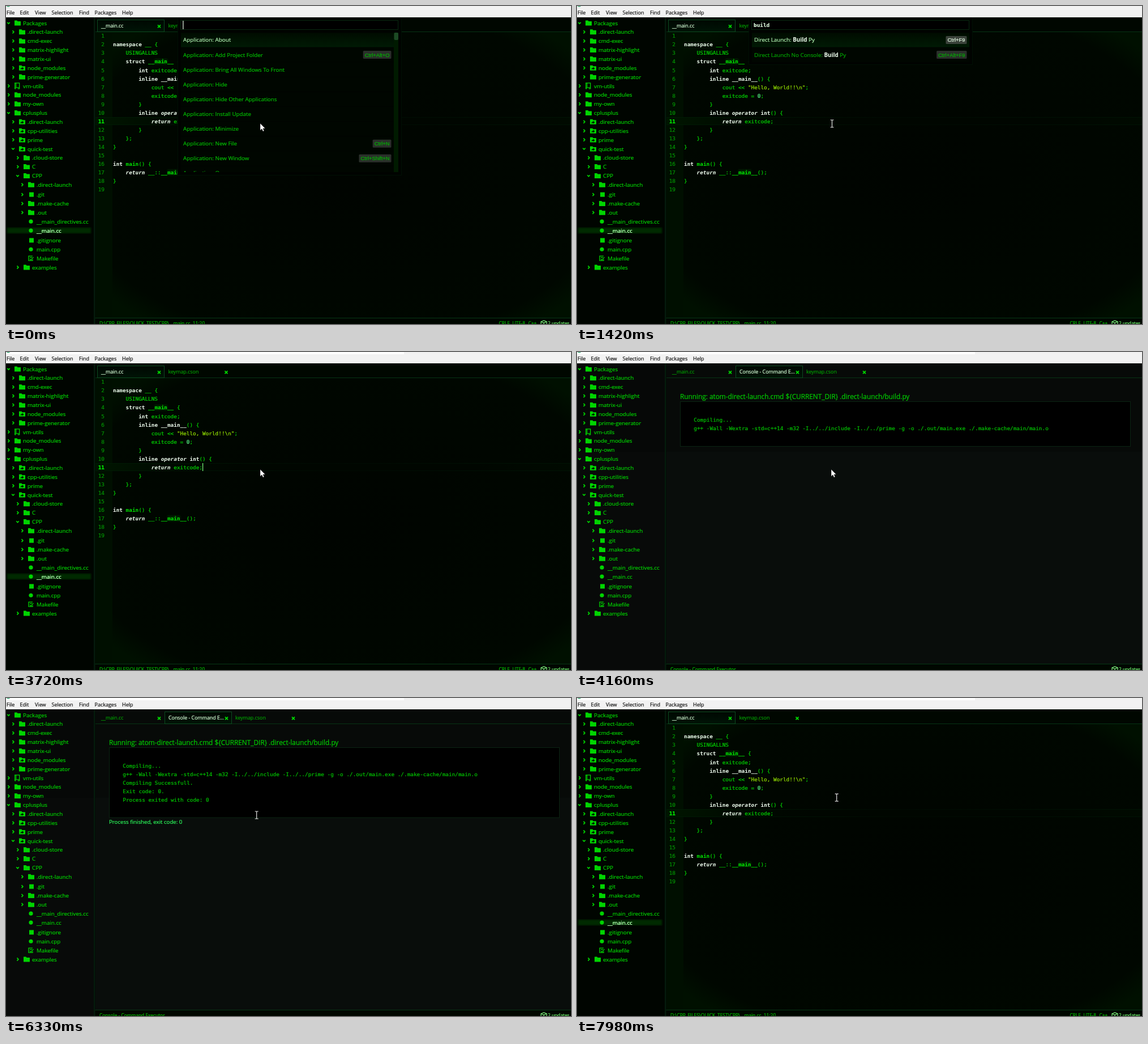
Recreate the animation shown at these times as an HTML page. Size 998x561 px, loop 8000 ms.

```html
<!DOCTYPE html>
<html lang="en">
<head>
<meta charset="utf-8">
<title>Editor build run</title>
<style>
  html, body { margin: 0; width: 100%; height: 100%; overflow: hidden; background: #000; }
  svg { display: block; width: 998px; height: 561px; }
  text { white-space: pre; font-family: "Open Sans", "Noto Sans", sans-serif; stroke-width: .22; }
  .mono { font-family: "DejaVu Sans Mono", monospace; font-size: 9.39px; }
  .key { font-family: "Liberation Sans", Arial, sans-serif; font-size: 9.4px; }
  .kw, .it, .hit { font-weight: bold; fill: #f0fff0; stroke: none; }
  .it { font-style: italic; }
  .str { fill: #96e400; stroke: #96e400; }
  .num { fill: #5cff8c; stroke: #5cff8c; }
  .name { fill: #00e600; font-weight: bold; stroke: none; }
</style>
</head>
<body>
<svg id="stage" viewBox="0 0 998 561" xmlns="http://www.w3.org/2000/svg"></svg>
<script>
const LOOP = 8000;
const GREEN = '#00d400';
const CELL = 5.653;
const stage = document.getElementById('stage');
const pen = document.createElement('canvas').getContext('2d');

const esc = s => s.replace(/&/g, '&amp;').replace(/</g, '&lt;');
const rect = (x, y, w, h, fill, extra = '') =>
  `<rect x="${x}" y="${y}" width="${w}" height="${h}" fill="${fill}" ${extra}/>`;
const rawText = (x, y, body, fill, size, extra = '') =>
  `<text x="${x}" y="${y}" fill="${fill}" stroke="${fill}" ${size ? `font-size="${size}"` : ''} ${extra}>${body}</text>`;
const label = (x, y, s, fill, size, extra) => rawText(x, y, esc(s), fill, size, extra);
const span = (cls, s) => `<tspan class="${cls}">${s}</tspan>`;
const group = (id, body) => `<g id="${id}">${body}</g>`;

// ---- menu and project tree ----
function menuBar() {
  const items = [['File', 1], ['Edit', 24.5], ['View', 51], ['Selection', 80.5],
    ['Find', 129], ['Packages', 156.5], ['Help', 205]];
  return rect(0, 0, 998, 20, '#f2f2f2') + group('titleStrip', rect(0, 0, 703, 4, '#fff')) +
    '<circle cx="4" cy="-2" r="3.5" fill="#3fae7a"/>' +
    items.map(([s, x]) => label(x, 15, s, '#151515', 9, 'stroke-width="0"')).join('');
}

function icon(kind, x, y) {
  const folder = `<path d="M${x} ${y - 4.5}h4.5l1 1.5h5.5v7.5h-11z" fill="${GREEN}"/>`;
  switch (kind) {
    case 'folder': return folder;
    case 'link': return folder +
      `<path d="M${x + 2.5} ${y + 2.5}q0-2.5 3-2.5v-1.7l3 2.6-3 2.6v-1.7z" fill="#000600"/>`;
    case 'repo': return `<path d="M${x + .7} ${y - 5}h8v8h-8zM${x + .7} ${y + 3}v2h2m3 0h3v-2M${x + 2.6} ${y - 5}v8" fill="none" stroke="${GREEN}" stroke-width="1.3"/>`;
    case 'square': return rect(x + 2, y - 4, 8, 8, GREEN);
    case 'dot': return `<circle cx="${x + 5}" cy="${y}" r="3.6" fill="${GREEN}"/>`;
    default: return `<path d="M${x + 8} ${y - 4}h-7v8h7v-2M${x + 3} ${y - 1.5}h4M${x + 3} ${y + 1}l2 2 4.5-5" fill="none" stroke="${GREEN}" stroke-width="1.3"/>`;
  }
}

function chevron(x, y, open) {
  const d = open ? `M${x - 2.3} ${y - 1.2}l2.3 2.4 2.3-2.4` : `M${x - 1} ${y - 2.6}l2.4 2.6-2.4 2.6`;
  return `<path d="${d}" fill="none" stroke="${GREEN}" stroke-width="1.7"/>`;
}

// Each row: depth, arrow (v open, > closed, - none), icon, name
const TREE = `0 v folder Packages
1 > folder .direct-launch
1 > folder cmd-exec
1 > folder matrix-highlight
1 > folder matrix-ui
1 > link node_modules
1 > folder prime-generator
0 > repo vm-utils
0 > folder node_modules
0 > folder my-own
0 v folder cplusplus
1 > link .direct-launch
1 > link cpp-utilities
1 > link prime
1 v link quick-test
2 > folder .cloud-store
2 > folder C
2 v folder CPP
3 > folder .direct-launch
3 > square .git
3 > folder .make-cache
3 > folder .out
3 - dot __main_directives.cc
3 - dot __main.cc
3 - square .gitignore
3 - dot main.cpp
3 - make Makefile
2 > folder examples`.split('\n').map(row => row.split(' '));
const rowY = i => 30 + 15.85 * i + (i >= 19 ? 1.5 : 0) + (i >= 24 ? 1.5 : 0);

function tree() {
  return TREE.map(([depth, arrow, kind, name], i) => {
    const dx = depth * 8, y = rowY(i);
    return (arrow === '-' ? '' : chevron(4.5 + dx, y, arrow === 'v')) +
      icon(kind, 15 + dx, y) + label(30 + dx, y + 3.6, name, GREEN, 9.8);
  }).join('');
}

// ---- tabs and status ----
function tab(x, name, active, fill) {
  const color = fill || (active ? '#d8ffd8' : '#009a00');
  const cross = `<path d="M${x + 107} 33.4l5 5m0-5l-5 5" stroke="#00d800" stroke-width="1.9"/>`;
  const box = active ? rect(x + .5, 24.5, 118, 21, 'url(#tabFill)', 'stroke="#0c4a20"') : '';
  return box + label(x + 7, 38.4, name, color, 8.85) + cross;
}

const tabLine = (a, b) =>
  `<path d="M158 45.5H${a}M${b} 45.5H998" stroke="#063314"/>`;

function updatesBadge() {
  return '<path d="M945 557l5-2 5 2v5h-10zM945 557l5 2 5-2M950 559v3" fill="none" stroke="#7cf07c" stroke-width="1.2"/>' +
    label(957, 562.5, '2 updates', '#6cf06c', 8.3);
}

const statusBar = left => rect(157, 550, 841, 11, '#000700') +
  '<path d="M157 550.5H998" stroke="#073616"/>' +
  label(165, 562.5, left, '#00b800', 8.4) + updatesBadge();

// ---- code view ----
// *keyword*  ~italic keyword~  @name@  `number`
const CODE = [
  '', '*namespace* __ {', '    USINGALLNS', '    *struct* @__main__@ {',
  '        *int* exitcode;', '        *inline* *__main__*() {',
  '            cout << "Hello, World!!\\n";', '            exitcode = `0`;', '        }',
  '        *inline* ~operator~ *int*() {', '            ~return~ exitcode;', '        }',
  '    };', '}', '', '*int* @main@() {', '    ~return~ __::@__main__@();', '}', ''];
const lineY = i => 53 + 15.05 * i;

const paint = s => esc(s)
  .replace(/"[^"]*"/g, m => `\u0001${m}\u0002`)
  .replace(/\*([^*]+)\*/g, (_, s) => span('kw', s))
  .replace(/~([^~]+)~/g, (_, s) => span('it', s))
  .replace(/@([^@]+)@/g, (_, s) => span('name', s))
  .replace(/`([^`]+)`/g, (_, s) => span('num', s))
  .replace(/\u0001(.*?)\u0002/g, (_, s) => span('str', s));

function codeView() {
  const marks = [[13, 3], [17, 16]].map(([col, i]) =>
    rect(189 + col * CELL, lineY(i) - 5, 4 * CELL, 10, '#003400', 'opacity=".7" filter="url(#soft)"')).join('');
  const lines = CODE.map((s, i) => {
    const current = i === 10, y = lineY(i) + 3.3;
    return rawText(174, y, i + 1, current ? '#00f000' : '#009400', 0,
        `class="mono" text-anchor="end"${current ? ' font-weight="bold"' : ''}`) +
      rawText(189, y, paint(s), GREEN, 0, 'class="mono"');
  }).join('');
  return rect(0, 20, 156, 541, '#000500') + rect(158, 20, 840, 530, '#000700') +
    rect(158, 46, 840, 504, 'url(#vignette)') + rect(158, 46, 30, 504, '#000f00') +
    rect(2, 391, 148, 10, '#002c00', 'filter="url(#soft)"') +
    rect(158, 196, 840, 14, 'url(#lineGlow)') +
    '<path d="M158 196.5H998M158 209.5H998" stroke="url(#lineEdge)"/>' +
    marks + lines + tabLine(161, 280) + tab(161, '__main.cc', true) +
    group('keymapTab', tab(279.5, 'keymap.cson', false)) +
    group('keymapHover', tab(279.5, 'keymap.cson', false, '#00d000')) +
    statusBar('D:\\CPP_FILES\\QUICK_TEST\\CPP\\__main.cc  11:20') +
    [['CRLF', 870.5], ['UTF-8', 894.5], ['C++', 922.5]].map(([s, x]) => label(x, 562.5, s, '#00b800', 8.4)).join('') +
    group('codeCaret', rect(347, 196, 1.2, 14, '#7cff7c'));
}

// ---- console view ----
const OUTPUT = ['Compiling...',
  'g++ -Wall -Wextra -std=c++14 -m32 -I../../include -I../../prime -g -o ./.out/main.exe ./.make-cache/main/main.o',
  'Compiling Successfull.', 'Exit code: 0.', 'Process exited with code: 0'];

function consoleView() {
  return rect(0, 20, 156, 541, '#080a09') + rect(158, 20, 840, 530, '#090d0b') +
    rect(0, 20, 998, 156, '#000', 'opacity=".25"') +
    tabLine(280, 398) + tab(161, '__main.cc', false) +
    tab(280, 'Console - Command E...', true) + tab(398, 'keymap.cson', false) +
    label(182, 83, 'Running: atom-direct-launch.cmd ${CURRENT_DIR} .direct-launch/build.py', '#00cc00', 11.8) +
    rect(182.5, 87.5, 795, 123, '#000', 'id="outBox" stroke="#0b2412"') +
    OUTPUT.map((s, i) => label(206.3, 122.8 + 15.05 * i, s, '#00c400', 0, `class="mono" id="out${i}"`)).join('') +
    label(182, 222.3, 'Process finished, exit code: 0', '#2cf85a', 9.7, 'id="finished"') +
    statusBar('Console - Command Executor');
}

// ---- command palette ----
function keyBadge(right, y, keys, bright) {
  pen.font = '9.4px "Liberation Sans", Arial, sans-serif';
  const w = pen.measureText(keys).width + 6;
  return rect(right - w, y - 7, w, 14, bright ? '#3a423a' : '#2a302a', 'rx="1.5"') +
    label(right - w + 3, y + 3.4, keys, bright ? '#e0f8e0' : '#00b000', 0, 'class="key"');
}

function palette(id, bottom, items, color, scroll) {
  const right = scroll ? 685 : 693;
  const rows = items.map(([name, keys], i) => {
    const y = 60 + 26.1 * i, first = i === 0;
    return rect(309, y - 12.6, right - 309, 25.2, first ? 'url(#rowFill)' : '#000600') +
      rawText(313, y + 3.4, esc(name).replace(/\[(.*?)\]/g, (_, s) => span('hit', s)),
        first ? '#b4f4b4' : color, 9.83) +
      (keys ? keyBadge(right - 4.5, y, keys, first) : '');
  }).join('');
  const bar = scroll ? rect(685, 47, 8, 246, '#001a00') + rect(685.5, 47, 7.5, 13, '#1c4a24', 'rx="2"') : '';
  return group(id, rect(303, 20, 396, bottom - 20, '#000300') +
    `<path d="M303.5 20V${bottom - .5}H698.5V20" fill="none" stroke="#001004"/>` +
    rect(308.5, 25.5, 384, 16, '#000', 'stroke="#08280f"') +
    `<g clip-path="url(#listClip)">${rows}</g>` + bar);
}

const ALL = [['Application: About'], ['Application: Add Project Folder', 'Ctrl+Alt+O'],
  ['Application: Bring All Windows To Front'], ['Application: Hide'],
  ['Application: Hide Other Applications'], ['Application: Install Update'],
  ['Application: Minimize'], ['Application: New File', 'Ctrl+N'],
  ['Application: New Window', 'Ctrl+Shift+N'], ['Application: Open']];
const launches = hit => [
  [`Direct Launch: ${hit} Py`, 'Ctrl+F9'], [`Direct Launch No Console: ${hit} Py`, 'Ctrl+Alt+F9']];
const NEAR = [...launches('[Bui]ld'), ['Editor: Cut To End Of [Bu]ffer L[i]ne'],
  ['Fuzzy Finder: Toggle [Bu]ffer F[i]nder', 'Ctrl+B'],
  ['[B]ookmarks: J[u]mp To Prev[i]ous Bookmark', 'Shift+F2'],
  ['Sym[b]ols View: Ret[u]rn From Declarat[i]on']];
const WIDE = [...launches('[Bu]ild'), ['Editor: Cut To End Of [Bu]ffer Line'],
  ['Fuzzy Finder: Toggle [Bu]ffer Finder', 'Ctrl+B'],
  ['[B]ookmarks: J[u]mp To Next Bookmark', 'F2'],
  ['[B]ookmarks: J[u]mp To Previous Bookmark', 'Shift+F2'],
  ['Sym[b]ols View: Ret[u]rn From Declaration'],
  ['Ta[b]s: Close All B[u]ffers'], ['[B]racket Matcher: Go To O[u]ter'],
  ['Editor: Fold [Bu]ffer']];

const gradient = (id, dir, stops) => `<linearGradient id="${id}" ${dir}>` +
  stops.map(([at, c]) => `<stop offset="${at}" stop-color="${c}"/>`).join('') + '</linearGradient>';
const DOWN = 'x1="0" y1="0" x2="0" y2="1"';

stage.innerHTML = `<defs>
  <radialGradient id="vignette" gradientUnits="userSpaceOnUse" cx="0" cy="0" r="1" gradientTransform="translate(593 298) scale(573 356)">
    <stop offset="0" stop-color="#000400"/><stop offset=".84" stop-color="#000700"/><stop offset=".94" stop-color="#001000"/>
  </radialGradient>
  ${gradient('tabFill', DOWN, [[0, '#000802'], [1, '#001406']])}
  ${gradient('rowFill', DOWN, [[0, '#000c00'], [1, '#001a04']])}
  ${gradient('lineGlow', '', [[0, '#001600'], [.15, '#000a00'], [.3, '#000600'], [.8, '#000600'], [1, '#000a00']])}
  <linearGradient id="lineEdge" gradientUnits="userSpaceOnUse" x1="158" y1="0" x2="998" y2="0">
    <stop offset="0" stop-color="#001c04"/><stop offset=".5" stop-color="#000a02"/><stop offset="1" stop-color="#001404"/>
  </linearGradient>
  <filter id="soft"><feGaussianBlur stdDeviation="1.6"/></filter>
  <clipPath id="listClip"><rect x="309" y="47" width="384" height="246"/></clipPath></defs>` +
  group('code', codeView()) + group('console', consoleView()) +
  rect(155, 20, 2.5, 541, '#051c0d') + menuBar() + tree() +
  group('selected', label(54, rowY(23) + 3.6, '__main.cc', '#d8ffd8', 9.8)) +
  palette('listAll', 299, ALL, '#00bc00', true) + palette('listWide', 299, WIDE, '#00a400', true) +
  palette('listNear', 209, NEAR, '#00a400') + palette('listFew', 104, launches('[Build]'), '#00a400') +
  group('field', rawText(312, 36.6, '', '#d8f4d8', 0, 'class="mono" id="query" font-weight="bold" stroke-width="0"') +
    rect(0, 26, 1.2, 15, '#e8ffe8', 'id="queryCaret"')) +
  group('arrow', '<path d="M0 0V12.4L2.9 9.8 4.9 14.2 6.9 13.3 5 9H8.8Z" fill="#fff" stroke="#000" stroke-width=".4"/>') +
  group('beam', '<path d="M-3-6.5H-1Q0-6.5 0-5.5Q0-6.5 1-6.5H3M0-5.5V5.5M-3 6.5H-1Q0 6.5 0 5.5Q0 6.5 1 6.5H3" fill="none" stroke="#e4e4e4" stroke-width="1.2"/>');

// ---- timeline ----
const QUERY = [[0, ''], [310, 'bu'], [460, 'bui'], [890, 'buil'], [1020, 'build']];
const LINES = [[0, 0], [4160, 2], [4310, 4], [4460, 5]];
const BOX = [[0, 49], [4160, 79], [4310, 123.5]];
const BLINK = [[0, true], [1420, false], [1820, true], [2220, false], [2650, true], [3050, false], [3450, true]];
const POINTER = [[0, 'arrow', 449, 207], [890, 'beam', 450.5, 207.5], [3720, 'arrow', 449, 207],
  [4310, 'beam', 450.5, 207.5], [6330, 'beam', 442.7, 206.5], [6450, 'beam', 432.5, 207],
  [6600, 'beam', 415.5, 175.5], [6750, 'beam', 404, 146], [6870, 'beam', 390, 108],
  [6990, 'beam', 393, 77.5], [7140, 'arrow', 390, 50], [7290, 'arrow', 389, 32],
  [7830, 'beam', 454.5, 223], [7980, 'beam', 458.7, 175.7]];

const byId = id => document.getElementById(id);
const show = (id, on) => byId(id).setAttribute('display', on ? 'inline' : 'none');
const at = (steps, t) => steps.filter(s => s[0] <= t).pop();

function draw(t) {
  const inConsole = t >= 3850 && t < 7440, open = t < 3720;
  show('code', !inConsole);
  show('console', inConsole);
  show('selected', !inConsole);
  show('titleStrip', !open);
  show('codeCaret', t >= 3720 && t < 7980);
  const hover = t >= 7440 && t < 7830;
  show('keymapHover', hover);
  show('keymapTab', !hover);

  const query = at(QUERY, t)[1];
  show('listAll', t < 310);
  show('listWide', t >= 310 && t < 460);
  show('listNear', t >= 460 && t < 890);
  show('listFew', t >= 890 && open);
  show('field', open);
  byId('query').textContent = query;
  byId('queryCaret').setAttribute('x', 312.3 + query.length * CELL);
  show('queryCaret', at(BLINK, t)[1]);

  const count = at(LINES, t)[1];
  OUTPUT.forEach((_, i) => show('out' + i, i < count));
  byId('outBox').setAttribute('height', at(BOX, t)[1]);
  show('finished', t >= 4460);

  const [, kind, x, y] = at(POINTER, t);
  for (const id of ['arrow', 'beam']) show(id, id === kind);
  byId(kind).setAttribute('transform', `translate(${x} ${y})`);
}

const start = performance.now();
function tick() {
  draw((performance.now() - start) % LOOP);
  requestAnimationFrame(tick);
}
tick();
</script>
</body>
</html>
```
